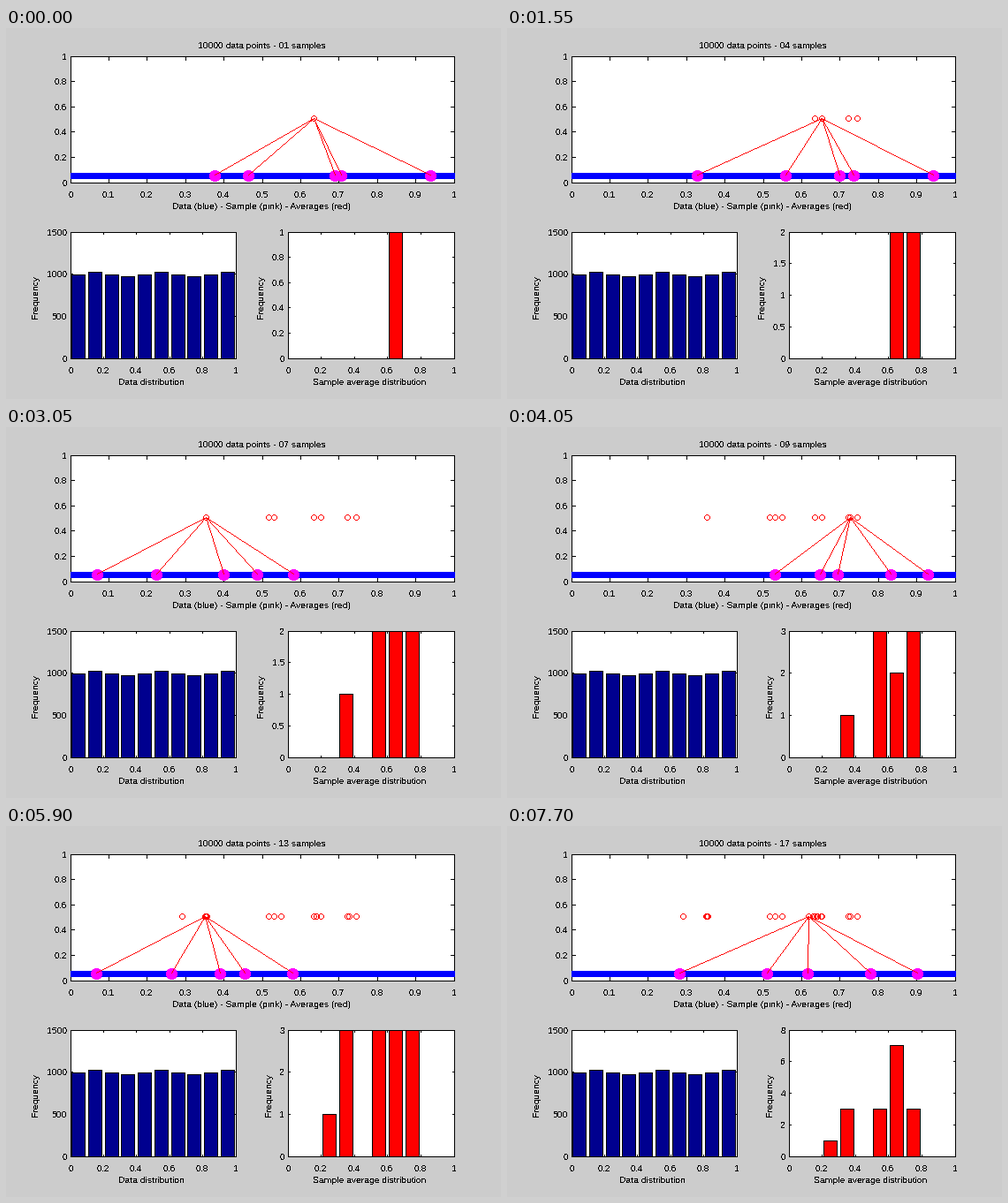
Animation, 560 px wide and 420 px high, one loop 8 s. Source, as a matplotlib script:

```python
import math

import numpy as np
import matplotlib.pyplot as plt
from matplotlib.animation import ArtistAnimation
from matplotlib.patches import Circle, Rectangle

W, H, DPI = 560, 420, 80
PX = 72 / DPI
STEP = 50
# Whole numbers fall a quarter into their pixel, so snapping has no ties
INSET = 0.25

plt.rcParams.update({
    "font.family": "Liberation Sans",
    "font.size": 10.4 * PX,
    "text.antialiased": False,
    "text.hinting": "native",
    "toolbar": "None",
})

fig = plt.figure(figsize=(W / DPI, H / DPI), dpi=DPI, facecolor="#cccccc")
ax = fig.add_axes([0, 0, 1, 1])
ax.set(xlim=(-INSET, W - INSET), ylim=(H - INSET, -INSET))
ax.axis("off")

# Plot boxes in pixels: left, right, top, bottom
MAIN = (73, 507, 32, 175)
DATA = (73, 260, 231, 374)
MEANS = (319, 507, 231, 374)

# Mean of each sample in drawing order; its points are spread by draw_points
AVERAGES = [.635, .722, .745, .653, .531, .517, .353, .549, .727,
            .641, .356, .291, .351, .630, .639, .651, .618]
DURATIONS = [550] + [500] * 4 + [500] * 4 + [450] * 7 + [300]


def to_x(area, v):
    return math.floor(area[0] + v * (area[1] - area[0]) + 1e-6)


def to_y(area, v):
    return math.floor(area[3] - v * (area[3] - area[2]) + 1e-6)


def line(xs, ys):
    return ax.plot(xs, ys, color="k", lw=PX, aa=False, zorder=1,
                   solid_capstyle="projecting")[0]


def pixels(xs, ys, z):
    return ax.plot(np.round(xs), np.round(ys), ",", color="r", aa=False,
                   zorder=z)[0]


def thin_line(x0, y0, x1, y1):
    n = max(abs(x1 - x0), abs(y1 - y0)) + 1
    return pixels(np.linspace(x0, x1, n), np.linspace(y0, y1, n), 4)


def ring(x, y, radius=3):
    a = np.arange(16) * math.pi / 8
    return pixels(x + radius * np.cos(a), y + radius * np.sin(a), 5)


def dot(x, y):
    return ax.add_patch(Circle((x + INSET, y + INSET), 6, fc="#ff00ff",
                               lw=0, aa=False, zorder=3))


def rect(x0, x1, y0, y1, color, z):
    return ax.add_patch(Rectangle((x0, y0), x1 - x0, y1 - y0, fc=color,
                                  ec="k", lw=PX, aa=False, zorder=z))


def label(x, y, s, ha="center"):
    return ax.text(x, y, s, ha=ha, va="baseline")


def x_ticks(area, step, size):
    top, bottom = area[2:]
    for v in np.arange(0, 1 + step / 2, step):
        x = to_x(area, v)
        line([x, x], [bottom, bottom - size])
        line([x, x], [top, top + size])
        label(x, bottom + 17, f"{v:.1g}")


def y_ticks(area, limit, step, size, title=""):
    left, right, top, bottom = area
    artists, width = [], 0
    for v in np.arange(0, limit + step / 2, step):
        y = to_y(area, v / limit)
        s = f"{round(v, 1):g}"
        width = max(width, 6 * len(s) - 3 * s.count("."))
        artists += [line([left, left + size], [y, y]),
                    line([right, right - size], [y, y]),
                    label(left - 4, y + 4, s, "right")]
    # The axis title keeps clear of the widest tick label
    artists.append(ax.text(left - 11 - width, (top + bottom) / 2 + 2, title,
                           rotation=90, ha="right", va="center"))
    return artists


def bars(area, counts, limit, color):
    n = len(counts)
    return [rect(to_x(area, (i + 0.1) / n), to_x(area, (i + 0.9) / n),
                 to_y(area, count / limit), area[3], color, 2)
            for i, count in enumerate(counts) if count]


def nice_scale(highest):
    step = next(s for s in (0.2, 0.5, 1, 2) if highest / s <= 5)
    return math.ceil(highest / step) * step, step


def draw_points(mean, rng):
    """Five spread-out values between 0 and 1 with the given mean."""
    points = (np.arange(5) + rng.random(5)) / 5
    middle = points.mean()
    if middle > mean:
        return points * mean / middle
    return 1 - (1 - points) * (1 - mean) / (1 - middle)


def draw_static():
    for area in (MAIN, DATA, MEANS):
        rect(*area, "w", 0)
    x_ticks(MAIN, 0.1, 4)
    y_ticks(MAIN, 1, 0.2, 4)
    x_ticks(DATA, 0.2, 2)
    y_ticks(DATA, 1500, 500, 2, "Frequency")
    x_ticks(MEANS, 0.2, 2)
    bars(DATA, 996 + 30 * np.sin(np.arange(10) * math.pi / 2), 1500, "#00008f")
    ax.add_patch(Rectangle((72.75, 163.75), 435, 7, fc="b", lw=0, aa=False,
                           zorder=2))
    label(289, 205, "Data (blue) - Sample (pink) - Averages (red)")
    label(164, 404, "Data distribution")
    label(411, 404, "Sample average distribution")


def draw_sample(k, points):
    """Everything that shows while sample k is the latest one."""
    averages = AVERAGES[:k]
    counts, _ = np.histogram(averages, bins=10, range=(0, 1))
    limit, step = nice_scale(counts.max())
    mean_y, data_y = to_y(MAIN, 0.5), to_y(MAIN, 0.05)
    mean_x = to_x(MAIN, averages[-1])
    artists = [label(289, 23, f"10000 data points - {k:02d} samples")]
    for x in (to_x(MAIN, p) for p in points):
        artists += [dot(x, data_y), thin_line(mean_x, mean_y, x, data_y)]
    artists += [ring(to_x(MAIN, a), mean_y) for a in averages]
    artists += y_ticks(MEANS, limit, step, 2, "Frequency")
    artists += bars(MEANS, counts, limit, "r")
    return artists


draw_static()
rng = np.random.default_rng(4)
frames = []
for k, duration in enumerate(DURATIONS, 1):
    artists = draw_sample(k, draw_points(AVERAGES[k - 1], rng))
    frames += [artists] * (duration // STEP)

anim = ArtistAnimation(fig, frames, interval=STEP, repeat=True, repeat_delay=0)
plt.show()
```
